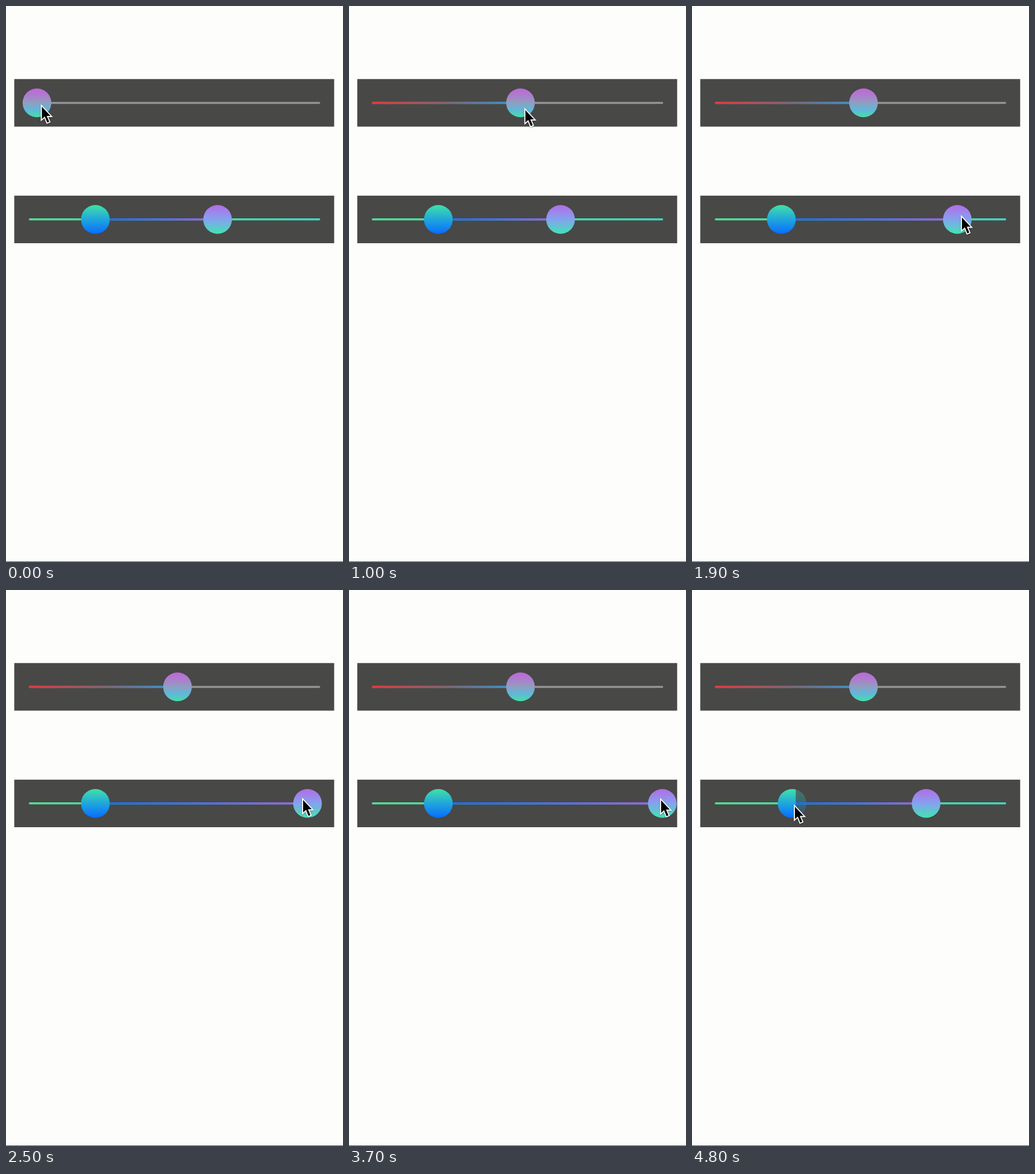
An HTML page for the animation above (4900 ms loop, 583x961 px).

```html
<!DOCTYPE html>
<html lang="en">
<head>
<meta charset="utf-8">
<title>Gradient sliders</title>
<style>
  html, body { margin: 0; width: 100%; height: 100%; overflow: hidden; background: #fdfdfc; }
  svg { display: block; width: 583px; height: 961px; }
  .panel { fill: #484847; }
  #cursor { filter: drop-shadow(0 1px 1px rgba(0, 0, 0, .3)); }
</style>
</head>
<body>
<svg viewBox="0 0 583 961">
  <defs id="defs">
    <clipPath id="painted"><rect x="14" y="327" width="165.5" height="83"/></clipPath>
  </defs>

  <rect y="960" width="583" height="1" fill="#555"/>

  <rect class="panel" x="14.3" y="126.3" width="553.4" height="82.2"/>
  <rect x="39.5" y="165.8" width="504" height="3.4" rx="1.7" fill="#949496"/>
  <rect id="fill" x="39.5" y="165.8" height="3.4" rx="1.7" fill="url(#warm)"/>
  <circle id="single" cy="167.4" r="24.8" fill="url(#rose)"/>

  <rect class="panel" x="14.3" y="327.8" width="553.4" height="82.2"/>
  <rect x="39.5" y="367.1" width="504" height="3.4" rx="1.7" fill="url(#mint)"/>
  <circle id="ghost" cy="368.9" r="24.8" fill="url(#ocean)" opacity=".3"/>
  <rect id="range" y="367.1" height="3.4" fill="url(#violet)"/>
  <g clip-path="url(#painted)"><circle id="low" cy="368.9" r="24.8" fill="url(#ocean)"/></g>
  <circle id="high" cy="368.9" r="24.8" fill="url(#lilac)"/>

  <path id="cursor" d="M2 4.5V26L7 21.5L11.3 32L14.7 30.6L10.4 20.6H17Z"
        stroke="#fff" stroke-width="3.6" paint-order="stroke"/>
</svg>
<script>
  const LOOP = 4900, STEP = 100, GRIP = 6;
  const $ = id => document.getElementById(id);
  const clamp = (v, min, max) => Math.max(min, Math.min(max, v));

  function set(el, attrs) {
    for (const key in attrs) el.setAttribute(key, attrs[key]);
    return el;
  }
  const make = (parent, tag, attrs) =>
    set(parent.appendChild(document.createElementNS("http://www.w3.org/2000/svg", tag)), attrs);

  // Evenly spaced stops, left to right or top to bottom
  function gradient(id, vertical, ...colors) {
    const g = make($("defs"), "linearGradient", vertical ? { id, x2: 0, y2: 1 } : { id });
    colors.forEach((color, i) =>
      make(g, "stop", { offset: i / (colors.length - 1), "stop-color": color }));
  }
  gradient("warm", false, "#e8383a", "#7f6470", "#2f9be0");
  gradient("mint", false, "#50e096", "#42d8bc");
  gradient("violet", false, "#0c6cff", "#5068f6", "#b05ae0");
  gradient("rose", true, "#c066dc", "#ad7ecc", "#8d9fc0", "#5fb8da", "#44e0a4");
  gradient("ocean", true, "#40e0a8", "#20a6dc", "#086cff");
  gradient("lilac", true, "#b46ce8", "#84a2ee", "#40e4b4");

  // Pointer path after the first drag: time, x, y
  const path = [
    [1000, 302.5, 175.5], [1500, 372, 356], [1800, 465, 361], [1900, 465, 361],
    [2200, 541, 360], [2500, 512, 358.5], [2800, 455, 359], [3000, 486.5, 359],
    [3300, 546, 359], [3600, 550, 359], [3700, 538, 359], [4200, 411, 362],
    [4500, 230, 376], [4800, 176, 370]
  ];

  // Smooth curve through the path, with slopes taken from neighbouring points
  function follow(t) {
    const last = path.length - 1;
    const at = i => path[clamp(i, 0, last)];
    const i = clamp(path.findIndex(point => point[0] > t) - 1, 0, last);
    if (t >= at(last)[0]) return at(last).slice(1);
    const a = at(i), b = at(i + 1), span = b[0] - a[0], p = (t - a[0]) / span;
    const slope = (j, k) => (at(j + 1)[k] - at(j - 1)[k]) / (at(j + 1)[0] - at(j - 1)[0]);
    return [1, 2].map(k =>
      a[k] + (b[k] - a[k]) * p * p * (3 - 2 * p) +
      span * p * (1 - p) * (slope(i, k) * (1 - p) - slope(i + 1, k) * p));
  }

  // The first knob is swung from end to end
  const swing = t => [281 - 269 * Math.cos(t * .01152 - .607), 169.5 + t * .006];
  const pointer = t => t <= 1000 ? swing(t) : follow(t);

  function draw(t) {
    const [x, y] = pointer(t);
    const single = clamp(swing(Math.min(t, 1000))[0] - GRIP - .5, 40, 543);
    // The upper knob trails the pointer by one step while held
    const high = Math.min(542, pointer(clamp(t, 1600, 4300) - STEP)[0] - GRIP);
    const low = t < 4800 ? 154.6 : 173.2;

    set($("fill"), { width: single - 39.5 });
    set($("range"), { x: low, width: high - low });
    set($("single"), { cx: single });
    set($("ghost"), { cx: low });
    set($("low"), { cx: low });
    set($("high"), { cx: high });
    set($("cursor"), { transform: `translate(${x} ${y})` });
  }

  const start = performance.now();
  function tick() {
    const t = (performance.now() - start) % LOOP;
    draw(Math.floor(t / STEP) * STEP);
    requestAnimationFrame(tick);
  }
  tick();
</script>
</body>
</html>
```
